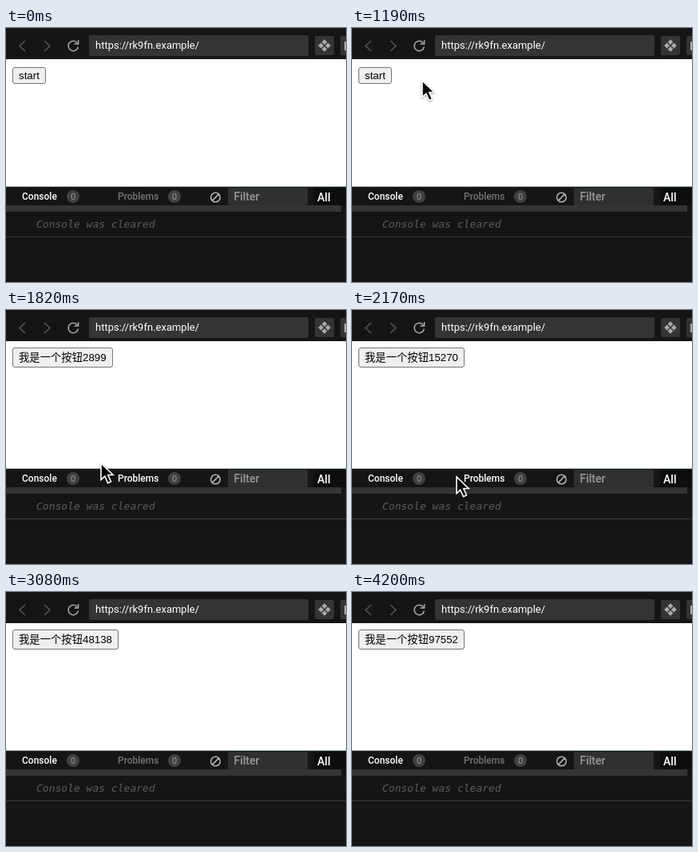
An HTML page that plays this animation: 426 px wide and 318 px high, repeating every 4270 ms.

```html
<!DOCTYPE html>
<html lang="en">
<head>
<meta charset="utf-8">
<title>Button counter</title>
<style>
  html, body { margin: 0; width: 100%; height: 100%; overflow: hidden; background: #151515; }
  svg { display: block; width: 100%; height: 100%; }
  text { font-family: Roboto, sans-serif; white-space: pre; }
  .tab { font-size: 12px; font-weight: 500; }
  .count { font-size: 11px; fill: #999; text-anchor: middle; }
  .tool { font-size: 14px; font-weight: 500; }
  .log { font: italic 13px "DejaVu Sans Mono", monospace; fill: #5c5c5c; }
  .label { font: 13.333px "Liberation Sans", "Noto Sans CJK SC", "Noto Sans CJK", sans-serif; }
  .line { fill: none; stroke-width: 1.5; }
</style>
</head>
<body>
<svg viewBox="0 0 426 318">
  <rect width="426" height="318" fill="#151515"/>

  <!-- address bar -->
  <path class="line" stroke="#555" d="M24 16L17 22.5L24 29M48 16L55 22.5L48 29"/>
  <path class="line" stroke="#aaa" d="M89.3 18.8A6.2 6.2 0 1 0 90.4 23.5M90.6 15V20H85.6"/>
  <rect x="104" y="9" width="275" height="26" rx="2" fill="#343434"/>
  <text x="112" y="26" font-size="13" fill="#fff">https://rk9fn.example/</text>
  <rect x="387" y="10" width="24" height="24" rx="2" fill="#343434"/>
  <path fill="#aaa" d="M399 14.2l3.4 3.4l-3.4 3.4l-3.4 -3.4zM399 23l3.4 3.4l-3.4 3.4l-3.4 -3.4zM394.6 18.6l3.4 3.4l-3.4 3.4l-3.4 -3.4zM403.4 18.6l3.4 3.4l-3.4 3.4l-3.4 -3.4z"/>
  <rect x="419" y="10" width="10" height="24" rx="2" fill="#343434"/>
  <rect x="424" y="17" width="2" height="11" fill="#aaa"/>

  <!-- page -->
  <rect y="39" width="426" height="160" fill="#fff"/>
  <rect id="button" x="8.5" rx="2.5"/>
  <text id="label" class="label" x="16" y="64"></text>

  <!-- console -->
  <rect y="198" width="426" height="1" fill="#9fb5a8"/>
  <text class="tab" x="20" y="215" fill="#fff">Console</text>
  <circle cx="84" cy="211" r="8" fill="#404040"/>
  <text class="count" x="84" y="215">0</text>
  <text id="problems" class="tab" x="140" y="215">Problems</text>
  <circle cx="211" cy="211" r="8" fill="#404040"/>
  <text class="count" x="211" y="215">0</text>
  <path class="line" stroke="#b5b5b5" d="M256.7 212a5.8 5.8 0 1 0 11.6 0a5.8 5.8 0 1 0 -11.6 0M258.5 216.1L266.6 207.9"/>
  <rect x="278" y="200" width="100" height="22" rx="2" fill="#303030"/>
  <text class="tool" x="285.5" y="216" fill="#9a9a9a">Filter</text>
  <rect x="386" y="200" width="40" height="22" fill="#0e0e0e"/>
  <text class="tool" x="390" y="217" fill="#fff">All</text>
  <rect y="222" width="420" height="8" fill="#343434"/>
  <text class="log" x="38" y="250">Console was cleared</text>
  <rect y="261" width="426" height="1" fill="#3a3a3a"/>

  <g id="cursor" style="filter: drop-shadow(0 1px 1px #0006)">
    <path id="arrow" fill="#000" stroke="#fff" stroke-width="1.6"
      d="M1 1.8V22.6L5.8 18.1L9.6 26.6L13.5 24.9L9.8 16.5H16.2Z"/>
    <g id="beam" fill="none" stroke-linecap="round">
      <path id="beamShape" stroke="#fff" stroke-width="4.2"
        d="M-5 -11Q0 -11 0 -7.5Q0 -11 5 -11M0 -7.5V7.5M-5 11Q0 11 0 7.5Q0 11 5 11M-3 2H3"/>
      <use href="#beamShape" id="beamCore"/>
      <path stroke="#000" stroke-width="1.6"
        d="M-5 -11Q0 -11 0 -7.5Q0 -11 5 -11M0 -7.5V7.5M-5 11Q0 11 0 7.5Q0 11 5 11M-3 2H3"/>
    </g>
  </g>
</svg>
<script>
  const LOOP = 4270, STEP = 70;
  const PRESS = 840, RELEASE = 980, COUNT_START = 1750;
  const CURSOR_IN = 70, CURSOR_OUT = 2870;

  // time, x, y
  const path = [
    [70, 217, 260], [140, 130, 110], [210, 48, 18], [280, 156, 118], [350, 156, 118],
    [700, 49, 70], [770, 38, 60], [840, 35, 57], [1050, 35, 57], [1120, 62, 58],
    [1190, 87, 64], [1610, 122, 205], [1820, 118, 190], [2170, 130, 207],
    [2520, 177, 246], [2730, 185, 296], [2800, 186, 312]
  ];
  // time, value
  const counts = [[1750, 431], [1820, 2899], [2520, 27641], [3080, 48138], [4200, 97552]];

  const $ = id => document.getElementById(id);
  const [button, label, problems, cursor, arrow, beam] =
    ['button', 'label', 'problems', 'cursor', 'arrow', 'beam'].map($);

  const smooth = p => p * p * (3 - 2 * p);

  function sample(points, t, ease = p => p) {
    const i = Math.max(1, points.findIndex(p => p[0] >= t));
    const from = points[i - 1], to = points[i];
    const span = to[0] - from[0];
    const raw = (t - from[0]) / span;
    const p = span > 200 ? ease(raw) : raw;
    return from.slice(1).map((v, k) => v + (to[k + 1] - v) * p);
  }

  const setAttrs = (el, attrs) => {
    for (const name in attrs) el.setAttribute(name, attrs[name]);
  };
  const show = (el, on) => { el.style.display = on ? '' : 'none'; };

  function drawButton(t) {
    const counting = t >= COUNT_START;
    const pressed = t >= PRESS && t < RELEASE;
    const text = counting ? '我是一个按钮' + Math.round(sample(counts, t)[0]) : 'start';
    if (label.textContent !== text) label.textContent = text;
    const digits = text.length - 6;
    setAttrs(button, {
      y: counting ? 47.5 : 49.5,
      width: counting ? Math.round(96 + digits * 7.415) - 1 : 41,
      height: counting ? 24 : 20,
      fill: pressed ? '#f5f5f5' : '#efefef',
      stroke: pressed ? '#8d8d8d' : '#767676'
    });
  }

  function drawCursor(t) {
    const visible = t >= CURSOR_IN && t < CURSOR_OUT;
    show(cursor, visible);
    let hovered = false;
    if (visible) {
      const [x, y] = sample(path, t, smooth).map(Math.round);
      const overText = x < 190 && y > 230 && y < 262;
      hovered = x > 115 && x < 228 && y > 188 && y < 222;
      show(arrow, !overText);
      show(beam, overText);
      cursor.setAttribute('transform', `translate(${x} ${y})`);
    }
    problems.setAttribute('fill', hovered ? '#fff' : '#757575');
  }

  const start = performance.now();
  function frame() {
    const elapsed = (performance.now() - start) % LOOP;
    const t = Math.floor(elapsed / STEP) * STEP;
    drawButton(t);
    drawCursor(t);
    requestAnimationFrame(frame);
  }
  frame();
</script>
</body>
</html>
```
